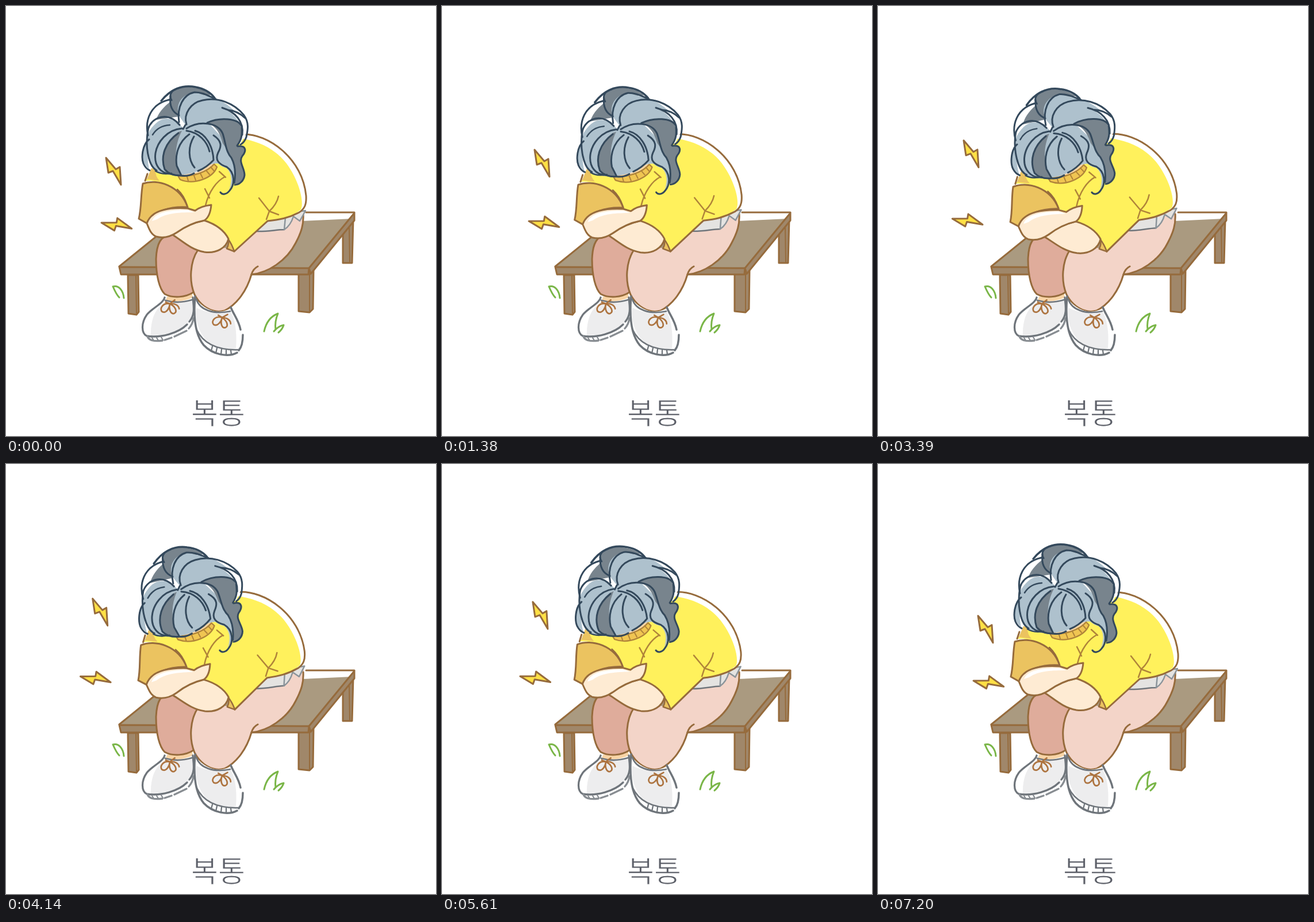
An HTML page for the animation above (7320 ms loop, 748x748 px).

```html
<!DOCTYPE html>
<html lang="ko">
<head>
<meta charset="utf-8">
<style>
  html, body { margin: 0; width: 100%; height: 100%; overflow: hidden; background: #fff; }
  svg { display: block; width: 100vw; height: 100vh; }
  path { stroke-linecap: round; stroke-linejoin: round; }
  /* the white stroke thins the regular weight to a light one */
  text { font: 300 51px "Noto Sans CJK KR", "Noto Sans CJK", "Noto Sans CJK JP", sans-serif; fill: #5c5f68; stroke: #fff; stroke-width: 1.1; }
</style>
</head>
<body>
<svg viewBox="0 0 748 748">
  <g id="bench"></g>
  <g id="legs"></g>
  <g id="body"></g>
  <g id="head"></g>
  <g id="boltA"></g>
  <g id="boltB"></g>
  <text x="369" y="726.5" text-anchor="middle">복통</text>
</svg>
<script>
const LOOP = 7320;
const BROWN = '#966b3c', FOLD = '#b08439', INK = '#34495c', GREY = '#6f757b';
const YELLOW = '#fff15c', OCHRE = '#ebc360', CREAM = '#feebd3', PINK = '#f3d4c8', ROSE = '#dfac9b';
const HAIR = '#aec1cd', DARK = '#78848d', WOOD = '#aa9a80', EDGE = '#a0876a';
const $ = id => document.getElementById(id);

function pen(id) {
  const add = (d, fill, stroke, width) => {
    const path = document.createElementNS('http://www.w3.org/2000/svg', 'path');
    path.setAttribute('d', d);
    path.setAttribute('fill', fill);
    path.setAttribute('stroke', stroke);
    path.setAttribute('stroke-width', width);
    $(id).append(path);
  };
  return {
    fill: (d, color) => add(d, color, 'none', 0),
    line: (d, color, width = 3) => add(d, 'none', color, width),
    both: (d, color, stroke, width = 3) => add(d, color, stroke, width)
  };
}

function drawBench() {
  const p = pen('bench');
  p.both('M586 384L586 447L602 447L604 372Z', EDGE, BROWN);
  p.line('M597 384L598 445', BROWN, 2);
  p.both('M212 468L213 535L227 537L231 532L230 468Z', EDGE, BROWN);
  p.both('M509 466L509 531L528 533L534 527L535 459Z', EDGE, BROWN);
  p.line('M528 466L528 531', BROWN, 2);
  p.line('M226 470L227 535', BROWN, 2);
  p.fill('M197 453L262 400L515 374L602 370L527 456Z', WOOD);
  p.both('M197 454L527 456L526 467L200 467Z', EDGE, BROWN);
  p.both('M527 456L606 360L606 373L530 466Z', EDGE, BROWN);
  p.line('M197 453L260 402M522 359L606 359', BROWN);
  // grass
  p.line('M186 488Q192 502 197 507M186 488C196 485 204 495 205 508', '#7ab648');
  p.line('M449 566C452 552 460 540 473 535C468 547 468 556 469 563M466 566Q473 557 483 555Q481 562 474 568', '#7ab648');
}

function drawLegs() {
  const p = pen('legs');
  p.fill('M280 506L324 498L325 515L277 515ZM331 506L335 526L391 533L392 524Z', '#f8d4a6');
  p.both('M290 398C268 398 262 415 261 440C261 470 267 492 276 501C291 509 312 507 326 498L336 425Z', ROSE, BROWN);
  p.fill('M336 415C322 440 318 478 328 502C338 521 358 536 380 530C402 519 419 495 427 467C455 464 488 444 504 412C514 393 520 378 518 355L440 385L398 423Z', PINK);
  p.line('M334 424C320 445 318 478 328 502C338 521 358 536 380 530C402 519 419 495 427 467C429 460 432 456 438 453', BROWN);
  p.line('M427 467C455 464 488 444 504 412C514 393 518 380 517 362', BROWN);

  // shoes
  p.fill('M277 513C255 526 239 542 238 558C238 570 243 574 251 575C276 573 300 566 317 553C329 541 327 520 325 507C310 514 295 515 277 513Z', '#fff');
  p.fill('M277 515C262 524 251 542 252 573C276 573 300 566 317 553C329 541 327 520 325 509C310 514 295 516 277 515Z', '#ededee');
  p.line('M276 507C274 517 255 525 245 537C235 551 235 569 245 574C269 578 300 569 315 554M319 549C330 536 326 520 325 507', GREY, 3.3);
  p.line('M277 512C294 517 311 515 324 511', GREY, 2.7);
  p.line('M246 575C249 582 258 584 272 582M276 581L288 577M293 575L314 565M318 561Q325 553 326 543', '#888d92', 3.3);
  p.line('M254 577L257 582M262 577L265 582M270 576L273 581', '#888d92', 2.3);
  p.fill('M330 510C327 540 332 563 343 579C358 595 384 600 408 597C416 575 405 543 391 526C370 537 350 532 330 510Z', '#fff');
  p.fill('M331 525C327 549 339 576 357 589C374 596 389 597 400 595C402 574 400 546 390 530C369 537 348 533 331 525Z', '#ededee');
  p.line('M329 505C326 538 328 571 344 590C359 606 386 612 402 603M405 599Q412 591 412 572M408 563C405 547 396 537 391 524', GREY, 3.5);
  p.line('M331 562C343 588 370 599 405 598M331 510C337 529 361 537 390 531', GREY, 2.7);
  p.line('M359 592L357 600M367 595L365 604M375 597L374 606M383 599L383 607M391 599L392 606', GREY, 2.3);

  const lace = 'M0 0C-9 -3 -15 5 -11 9C-6 12 -1 5 0 0C-3 8 0 14 4 13C9 11 6 4 0 0C7 0 11 4 11 8M0 0L-5 -3M0 0L7 -4';
  for (const [x, y, turn] of [[285, 518, -8], [376, 542, 0]]) {
    const knot = document.createElementNS('http://www.w3.org/2000/svg', 'g');
    knot.id = 'lace' + x;
    knot.setAttribute('transform', `translate(${x} ${y}) rotate(${turn}) scale(1.35)`);
    $('legs').append(knot);
    pen(knot.id).line(lace, '#ad7440', 2);
  }
}

function drawBody() {
  const p = pen('body');
  // shorts
  p.both('M455 374L434 392C455 393 469 389 484 389L492 367Z', '#e4e3e1', GREY, 2.5);
  p.both('M486 368L484 389Q495 382 500 366L511 374L521 356L507 358Z', '#e4e3e1', '#8b949a', 2.5);

  // shirt
  p.fill('M411 223C457 221 516 266 522 330C523 346 519 353 510 359L410 380Z', '#fff');
  p.fill('M262 284L242 304C282 302 309 325 317 351L329 356L356 346L345 373C366 380 380 391 387 405L397 427L455 374C477 372 500 366 513 354C519 341 510 304 488 274C466 246 437 235 408 230L365 270Q335 304 300 297Z', YELLOW);
  p.fill('M253 282L245 301L267 304Q259 295 260 284Z', OCHRE);
  p.line('M410 223C457 221 516 266 522 330C523 346 519 353 510 359C491 369 475 372 455 374L397 427L386 405', BROWN);
  p.both('M386 405Q393 414 397 427L384 422Q389 413 386 405Z', OCHRE, BROWN, 2.5);
  p.line('M242 304L246 292', BROWN);
  p.line('M381 297C367 304 353 322 347 347M346 318L354 334M371 288L382 298', FOLD, 2.5);
  p.line('M440 334L458 357L474 363M474 331Q471 345 458 357L453 371', FOLD, 2.5);

  // collar
  p.fill('M292 286C318 298 343 289 356 272L363 275C354 294 325 302 300 297Z', '#f7d5a5');
  p.both('M299 295C324 298 350 289 362 275L367 280C360 299 328 312 303 302Z', '#f0c552', FOLD, 2.3);
  p.line('M315 297L317 304M327 295L330 303M338 291L342 299M348 286L354 293M356 280L362 287', FOLD, 2);

  // sleeve and arms
  p.both('M238 309C263 300 303 312 316 350C288 348 255 356 245 378L231 370C236 350 234 330 238 309Z', OCHRE, BROWN);
  p.line('M298 319Q310 330 315 347', BROWN, 2.5);
  p.both('M297 394C312 383 330 376 345 373C366 380 380 391 387 405C383 421 366 431 345 428C322 424 307 409 290 398Z', CREAM, BROWN);
  p.both('M245 378C253 355 284 350 316 352L329 356C338 349 348 347 357 346C356 358 353 368 345 373C329 376 311 384 297 394C285 402 272 404 261 401C252 397 249 388 245 378Z', CREAM, BROWN);
  p.fill('M254 374C259 359 285 354 317 355L327 359C305 359 280 359 263 371Z', '#fff');
}

function drawHead() {
  const p = pen('head');
  // base colours
  p.fill('M248 224C241 196 253 171 274 163C292 141 322 134 344 145L362 159C392 166 418 184 423 207C420 222 412 230 408 240L300 240Z', '#fff');
  p.fill('M261 198C267 181 280 171 288 165C283 152 292 145 303 142C324 138 345 145 356 155C325 153 310 171 302 192Z', DARK);
  p.fill('M308 212C284 185 263 195 248 220C242 251 247 282 262 287C277 297 325 299 354 276C371 270 387 278 392 287L386 240L340 190Z', HAIR);
  p.fill('M303 194C291 172 307 152 329 150L360 160C385 167 403 185 409 201C385 195 352 202 315 211Z', HAIR);
  p.fill('M350 203C370 193 399 194 410 204C411 220 410 230 402 243C419 243 418 253 411 261C405 272 416 284 415 295C412 307 406 311 398 309C399 290 391 275 385 262C375 245 378 214 350 203Z', DARK);
  p.fill('M300 219C276 235 269 260 276 285C284 294 293 297 304 295C291 270 294 240 306 217Z', DARK);
  p.fill('M243 236Q236 253 239 272L249 285Q244 260 248 233Z', HAIR);
  p.fill('M365 225C382 242 388 257 395 270C400 284 398 307 388 319Q397 296 384 282C369 278 361 268 368 252Z', HAIR);
  p.fill('M379 178C398 184 414 192 418 207L411 225C411 205 400 190 379 178Z', '#fff');

  // crown
  p.line('M270 165C286 145 307 136 330 141C346 144 357 152 363 160', INK, 3.5);
  p.line('M247 225C241 198 252 170 284 163M288 164C282 153 290 145 300 143', INK);
  p.line('M286 157C284 174 290 185 301 190M301 202C297 176 308 154 328 150C343 150 353 157 365 162', INK);
  p.line('M314 206C308 187 322 168 342 164C369 158 397 169 414 190C424 204 420 218 418 228Q415 237 408 241', INK);
  p.line('M376 177C399 184 414 201 411 224M387 181Q402 182 416 195', INK);
  p.line('M247 214C255 191 283 184 302 207M308 214L312 207', INK);

  // fringe
  p.line('M248 211C241 241 247 278 262 286M249 232C237 241 235 264 239 274Q243 283 250 286', INK);
  p.line('M306 213C280 215 263 237 260 256C257 277 269 292 287 292', INK);
  p.line('M300 221C277 237 268 261 276 284Q285 295 304 295', INK);
  p.line('M319 223C299 237 294 260 297 278L305 295Q316 297 327 291', INK);
  p.line('M327 227C316 245 317 268 328 281', INK);
  p.line('M314 217C336 220 350 236 354 253M329 217C347 222 360 243 361 268Q349 281 334 287', INK);
  p.line('M255 224Q265 208 285 207M260 287Q270 294 288 291', INK, 2.5);

  // side waves
  p.line('M314 213C337 198 369 203 377 222C382 237 382 253 392 264C399 277 400 291 397 308', INK);
  p.line('M350 203C372 193 403 195 410 209C411 225 410 232 402 243', INK);
  p.line('M361 225C376 235 375 244 369 255C363 268 370 275 384 280C399 290 398 311 389 321C384 328 376 329 373 324', INK);
  p.line('M403 244C419 242 418 253 411 261C404 271 415 282 415 294C414 304 406 311 398 311', INK);
}

function drawBolt(id) {
  pen(id).both('M0 0L4 26L12 23L26 47L24 16L17 20Z', '#ffe045', BROWN);
}

// Each key: time, then values, linear between keys.
const LEAN = [[0, 0], [1380, .33], [2550, .65], [3390, .92], [4200, 1.03], [4920, 1], [6180, .67], [6750, .25], [7200, 0], [LOOP, 0]];
const BOLT_A = [[0, 0, 0], [1380, -13, -14], [2550, -21, -23], [3600, -26, -32], [6540, -11.5, -20.5], [7200, 0, 0], [LOOP, 0, 0]];
const BOLT_B = [[0, 0, 0], [3600, -39, -7.5], [6540, -26, -8], [7200, 0, 0], [LOOP, 0, 0]];

function sample(keys, t) {
  const i = keys.findIndex(key => key[0] > t);
  const a = keys[i - 1], b = keys[i];
  const k = (t - a[0]) / (b[0] - a[0]);
  return a.slice(1).map((v, n) => v + (b[n + 1] - v) * k);
}

const place = (id, transform) => $(id).setAttribute('transform', transform);

function render(now) {
  const t = Math.min(Math.floor(now % LOOP / 30) * 30, 7200);
  const [lean] = sample(LEAN, t);
  const [ax, ay] = sample(BOLT_A, t);
  const [bx, by] = sample(BOLT_B, t);
  place('body', `rotate(${-2.1 * lean} 400 400)`);
  place('head', `rotate(${-4.2 * lean} 375 340)`);
  place('boltA', `translate(${174 + ax} ${264 + ay})`);
  place('boltB', `translate(${166 + bx} ${377 + by}) rotate(-50)`);
}

drawBench();
drawLegs();
drawBody();
drawHead();
drawBolt('boltA');
drawBolt('boltB');

const start = performance.now();
function tick() {
  render(performance.now() - start);
  requestAnimationFrame(tick);
}
tick();
</script>
</body>
</html>
```
